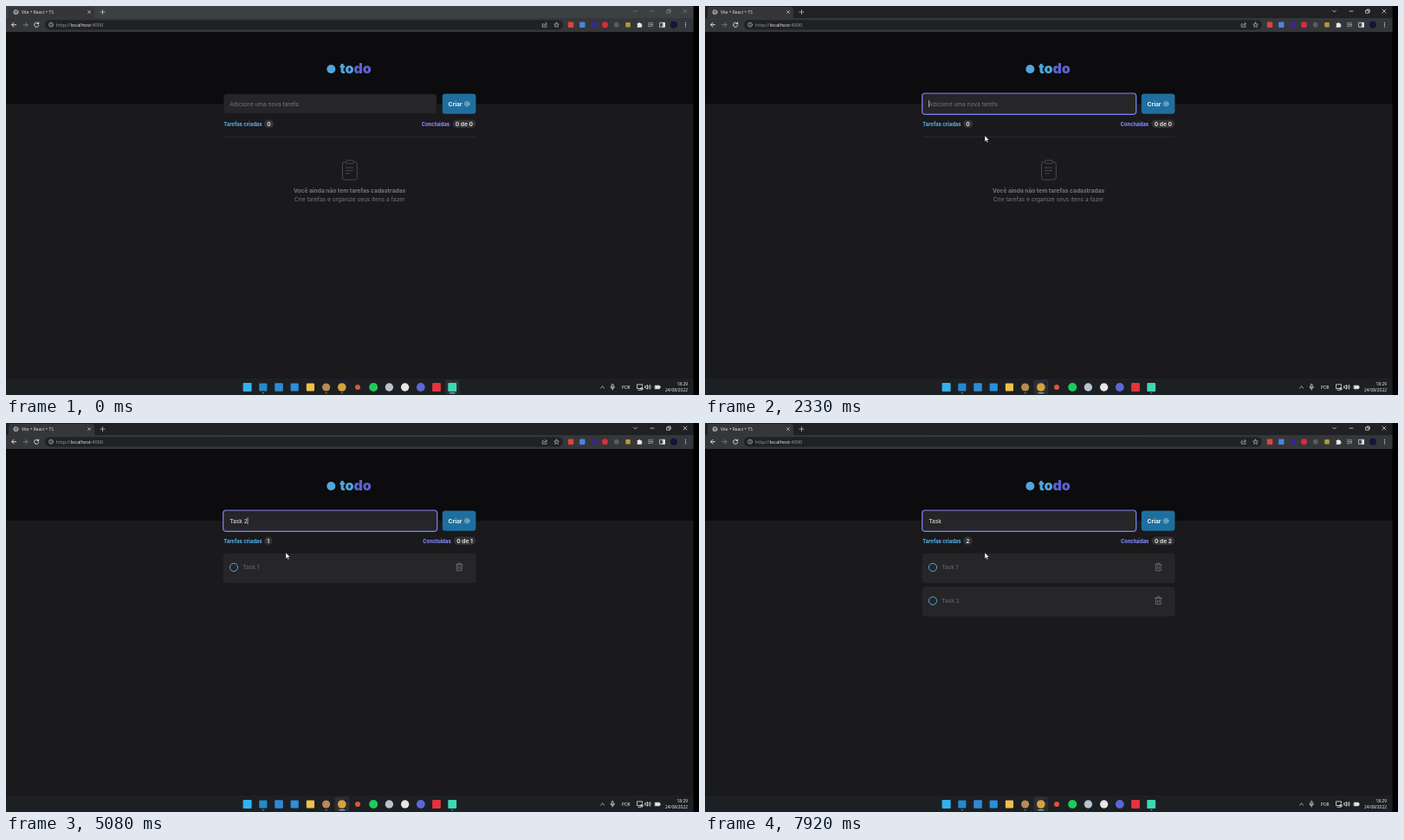
An HTML page that plays this animation: 800x450 px, repeating every 8 s.

```html
<!DOCTYPE html>
<html lang="pt-BR">
<head>
<meta charset="utf-8">
<title>todo</title>
<style>
  html, body { margin: 0; width: 100%; height: 100%; overflow: hidden; background: #000; }
  svg { display: block; width: 800px; height: 450px; }
  text { white-space: pre; }
  .page { font: 6.62px Inter, sans-serif; }
  .page .b { font-weight: 700; }
  .page .s { font-size: 5.8px; font-weight: 800; }
  .ui { font: 4.9px "Open Sans", "Noto Sans", sans-serif; fill: #e4e6e9; }
  .m { font-weight: 500; fill: #f4f5f6; }
  .line { fill: none; stroke-linecap: round; stroke-linejoin: round; }
</style>
</head>
<body>
<svg viewBox="0 0 800 450">
  <defs>
    <g id="card">
      <rect x="251.2" y="151.2" width="291" height="33.4" rx="3.2" fill="#262528" stroke="#302f32" stroke-width=".5"/>
      <circle cx="263" cy="167" r="4.6" fill="none" stroke="#4ea8de"/>
      <path class="line" stroke="#78777a" stroke-width=".8" d="M519.5 163.8h7.6M521.8 163.6v-1.3h3v1.3M520.4 164v6.8h5.8V164M522.3 166v2.8M524.3 166v2.8"/>
    </g>
  </defs>

  <rect width="794" height="450" fill="#1a191b"/>
  <rect y="29" width="794" height="84" fill="#0c0b0d"/>

  <!-- browser chrome -->
  <g class="ui">
    <rect id="strip" width="794" height="15"/>
    <path d="M1 14.5q2 0 2-2V4q0-3 3-3h93q3 0 3 3v8.500q0 2 2 2z" fill="#35363a"/>
    <rect y="14" width="794" height="16" fill="#35363a"/>
    <rect x="45" y="16.200" width="598" height="11.200" rx="5.600" fill="#202124"/>
    <g class="line" stroke="#c9ccd0" stroke-width=".7">
      <circle cx="11.500" cy="7" r="2.600" fill="#8d9094"/>
      <path stroke="#35363a" stroke-width=".6" d="M9.500 6.300l2 .7.500 2M12 4.700l-.4 1.300 2 .6"/>
      <path d="M94.500 5.500l3 3M97.500 5.500l-3 3M109 7h5M111.500 4.500v5"/>
    </g>
    <text x="18" y="8.800" style="font-size:4.850px">Vite + React + TS</text>
    <g id="controls" class="line" stroke="#e8eaed" stroke-width=".7">
      <path d="M724.500 5l2 2 2-2M744 6h4M763 5h3.200v3.200H763zM764 5V4h3.200v3.200h-1M782 4l4 4M786 4l-4 4"/>
    </g>
    <g class="line" stroke="#e8eaed" stroke-width=".9">
      <path d="M11.500 21.700H6.700M9 19.300l-2.400 2.400L9 24.100"/>
      <path stroke="#7c7f83" d="M20 21.700h4.800M22.500 19.300l2.400 2.400-2.400 2.400"/>
      <path d="M37.400 20.300a2.600 2.600 0 1 0 .4 2M37.700 18.900v1.700H36"/>
      <g stroke="#bdc1c6" stroke-width=".7">
        <circle cx="52" cy="21.700" r="2.500"/><path d="M52 21.500v1.300M52 20.300v.1"/>
        <path d="M620.500 20.800h-1.300v3.400h5v-1.200M621 22.600q.5-2 3-2M622.800 19.200l1.500 1.400-1.500 1.400"/>
        <path d="M635.500 19l.8 1.900 2 .2-1.500 1.300.5 2-1.800-1.100-1.800 1.100.5-2-1.500-1.300 2-.2z"/>
        <path d="M741.500 19.800h5M741.500 21.700h5M741.500 23.600h2.500M746 21.800v2"/>
        <path d="M755 19.300h5.500v5H755z" stroke="#e8eaed"/>
        <path d="M758.500 19.500h1.800v4.700h-1.800z" fill="#e8eaed" stroke="#e8eaed"/>
      </g>
    </g>
    <path fill="#e8eaed" d="M728.600 20h1.700a.9.900 0 0 1 1.800 0h1.600v1.700a.9.900 0 0 1 0 1.800v1.300h-5.100v-1.500a.9.900 0 0 0 0-1.700z"/>
    <g fill="#e8eaed"><circle cx="784.500" cy="19.600" r=".6"/><circle cx="784.500" cy="21.700" r=".6"/><circle cx="784.500" cy="23.800" r=".6"/></g>
    <text x="58" y="23.800" style="font-size:5.600px" fill="#9aa0a6">http://<tspan class="m">localhost</tspan>:4000</text>
    <g id="exts"></g>
  </g>

  <!-- page -->
  <g class="page">
    <circle cx="375.300" cy="73" r="5" fill="#4ea8de"/>
    <text x="385.200" y="77.800" style="font-size:16px;font-weight:900" fill="#4ea8de">to<tspan fill="#5e60ce">do</tspan></text>

    <rect id="field" x="251.200" y="101.700" width="246" height="22.800" rx="3.200" fill="#262528" stroke="#151416" stroke-width=".5"/>
    <text id="typed" x="258.200" y="115.600"></text>
    <rect id="caret" y="109" width=".6" height="8.200" fill="#f2f2f2"/>
    <rect x="503.800" y="101.500" width="38.600" height="23.200" rx="3.200" fill="#1e6f9f"/>
    <text class="b" x="510.600" y="115.600" fill="#f2f2f2">Criar</text>
    <g class="line" stroke="#d9e4ec" stroke-width=".6"><circle cx="532.200" cy="113.200" r="2.700"/><path d="M530.900 113.200h2.600M532.200 111.900v2.600"/></g>

    <text class="b s" x="251.300" y="138.800" fill="#4ea8de">Tarefas criadas</text>
    <rect id="madePill" x="298" y="131.600" height="9.300" rx="4.650" fill="#333235"/>
    <text id="made" class="b" y="138.600" text-anchor="middle" fill="#d9d9d9"></text>
    <text id="doneLabel" class="b s" y="138.800" text-anchor="end" fill="#8284fa">Concluídas</text>
    <rect id="donePill" y="131.600" height="9.300" rx="4.650" fill="#333235"/>
    <text id="done" class="b" x="538.900" y="138.600" text-anchor="end" fill="#d9d9d9"></text>

    <g id="empty">
      <rect x="251" y="151" width="291" height=".6" fill="#333235"/>
      <g class="line" stroke="#49484b" stroke-width="1" transform="translate(0 -.3)">
        <path d="M392.500 180.700h-1.500q-2.500 0-2.500 2.500v15.600q0 2.500 2.500 2.500h11.800q2.500 0 2.500-2.500v-15.600q0-2.500-2.500-2.500h-1.500"/>
        <rect x="392.500" y="178.700" width="8.800" height="3.800" rx="1"/>
        <path d="M392.500 187.300h7.800M392.500 190.700h7.800M392.500 194.100h4.500"/>
      </g>
      <g text-anchor="middle" fill="#78777a">
        <text class="b" x="396.600" y="215.900">Você ainda não tem tarefas cadastradas</text>
        <text x="396.600" y="225.500">Crie tarefas e organize seus itens a fazer</text>
      </g>
    </g>
    <g id="task1"><use href="#card"/><text x="273.200" y="169.400" fill="#6d6c6f">Task 1</text></g>
    <g id="task2" transform="translate(0 38.700)"><use href="#card"/><text x="273.200" y="169.400" fill="#6d6c6f">Task 2</text></g>
  </g>

  <!-- taskbar -->
  <g class="ui">
    <rect y="431" width="794" height="19" fill="#1c2023"/>
    <rect id="active" y="432.500" width="16.500" height="16.500" rx="1.800" fill="#2b3033"/>
    <g id="apps"></g>
    <rect id="bar" y="447.200" width="7" height="1.100" rx=".55" fill="#8cc8dc"/>
    <g class="line" stroke="#e4e6e9" stroke-width=".8">
      <path d="M686.600 442l2-2 2 2"/>
      <path d="M699.200 438.400a1 1 0 0 1 2 0v2a1 1 0 0 1-2 0zM698 440.500q0 2 2.200 2t2.200-2M700.200 442.500v1.500"/>
      <path d="M734.500 442.500h-6v-4.700h6v2M730 444.300h2.500M733.500 441.500h1.500v2.500h-1.500z"/>
      <path d="M738 439.800h1l1.500-1.500v5l-1.500-1.500h-1zM742 439.300q1 1.500 0 3M743.500 438.300q1.700 2.500 0 5"/>
      <path d="M749.500 439.200h5v3.600h-5z" fill="#e4e6e9"/><path d="M755.300 440.500v1"/>
    </g>
    <g class="m">
      <text x="711" y="442.800" style="font-size:4.800px">POR</text>
      <text x="787" y="439.300" text-anchor="end">18:29</text>
      <text x="787" y="445.800" text-anchor="end">24/08/2022</text>
    </g>
  </g>

  <rect x="793.600" width="6.400" height="450" fill="#000"/>
  <path id="cursor" d="M0 0v7l1.600-1.500 1.100 2.400 1.100-.5-1.100-2.300h2.200z" fill="#fff" stroke="#111" stroke-width=".35"/>
</svg>
<script>
const $ = id => document.getElementById(id);
const set = (id, attrs) => { for (const k in attrs) $(id).setAttribute(k, attrs[k]); };
const show = (id, on) => { $(id).style.display = on ? '' : 'none'; };

const dot = (x, y, r, c) => `<circle cx="${x}" cy="${y}" r="${r}" fill="${c}"/>`;
const box = (x, y, r, c) => `<rect x="${x - r}" y="${y - r}" width="${2 * r}" height="${2 * r}" rx="1" fill="${c}"/>`;

$('exts').innerHTML =
  box(652, 21.7, 3.2, '#d8473a') + box(665.3, 21.7, 3.2, '#4b86d8') +
  dot(679, 21.7, 3, '#3a249c') + dot(691.5, 21.7, 3.4, '#dd2a3c') +
  dot(704.8, 21.7, 2.9, '#5b5c60') + box(718, 21.7, 2.8, '#b39a35') +
  dot(771, 21.7, 4, '#17133a');

const appX = i => 278.6 + i * 18.2;
const apps = [
  [box, 5, '#35b0ee'], [box, 4.6, '#2489ca'], [box, 4.8, '#2f8ad6'], [box, 4.6, '#2a8fdc'],
  [box, 4.6, '#f0c04a'], [dot, 4.6, '#b98a52'], [dot, 4.8, '#d7a23c'], [dot, 3, '#e0553a'],
  [dot, 5, '#1fca5c'], [dot, 4.7, '#b9c3cf'], [dot, 4.7, '#e9e4e8'], [dot, 4.9, '#5c67d6'],
  [box, 4.9, '#e5333d'], [box, 4.9, '#3fd6b4']
];
$('apps').innerHTML = apps.map(([shape, r, c], i) => shape(appX(i), 441, r, c)).join('') +
  dot(393, 436.5, 2, '#231a55') +
  [1, 5, 6, 13].map(i => `<rect x="${appX(i) - 1.3}" y="447.3" width="2.600" height=".9" rx=".45" fill="#8b8f93"/>`).join('');

const LOOP = 8000, CLICK = 1870, ENTER = [3600, 5670];
const BROWSER = 6, RECORDER = 13;

// [time, x, y] of the pointer tip
const path = [[1130, 60, 416], [1170, 120, 386], [1330, 196, 300], [1500, 272, 196],
  [1670, 314, 128], [1830, 322, 115], [1950, 322, 115], [2160, 323, 150]];

// [time, text in the field]
const keys = [[CLICK, '']];
const type = (word, times) => times.forEach((t, i) => keys.push([t, word.slice(0, i + 1)]));
type('Task 1', [2670, 2800, 2900, 3000, 3150, 3330]);
keys.push([ENTER[0], '']);
type('Task 2', [4420, 4520, 4600, 4680, 4780, 4920]);
keys.push([ENTER[1], '']);
type('Task ', [6580, 6830, 6920, 7080, 7250]);

function pointer(t) {
  let i = 0;
  while (i < path.length - 2 && t > path[i + 1][0]) i++;
  const [a, x, y] = path[i], [b, u, v] = path[i + 1];
  const p = Math.min(1, Math.max(0, (t - a) / (b - a)));
  return [x + (u - x) * p, y + (v - y) * p];
}

function draw(t) {
  const focus = t >= CLICK;
  const [since, value] = keys.filter(k => k[0] <= t).pop() || [0, ''];
  const count = ENTER.filter(e => e <= t).length;

  show('cursor', t >= path[0][0]);
  set('cursor', { transform: `translate(${pointer(t)})` });

  set('strip', { fill: focus ? '#202124' : '#3c4043' });
  $('controls').style.opacity = focus ? 1 : .38;
  const app = appX(focus ? BROWSER : RECORDER);
  set('active', { x: app - 8.25 });
  set('bar', { x: app - 3.5 });

  set('field', focus
    ? { x: 250.7, y: 101, width: 247, height: 24.3, stroke: '#8284fa', 'stroke-width': 1.2 }
    : { x: 251.2, y: 101.7, width: 246, height: 22.8, stroke: '#151416', 'stroke-width': .5 });
  $('typed').textContent = value || 'Adicione uma nova tarefa';
  set('typed', { fill: value ? '#f2f2f2' : '#78777a' });
  show('caret', focus && (t - since) % 1000 < 500);
  set('caret', { x: 258.2 + (value ? $('typed').getComputedTextLength() : 0) });

  $('made').textContent = count;
  const w = $('made').getComputedTextLength() + 6.6;
  set('madePill', { width: w });
  set('made', { x: 298 + w / 2 });
  $('done').textContent = '0 de ' + count;
  const d = $('done').getComputedTextLength() + 6.6;
  set('donePill', { x: 542.2 - d, width: d });
  set('doneLabel', { x: 538.9 - d });

  show('empty', count === 0);
  show('task1', count > 0);
  show('task2', count > 1);
}

const start = performance.now();
function tick() {
  draw((performance.now() - start) % LOOP);
  requestAnimationFrame(tick);
}
tick();
</script>
</body>
</html>
```
